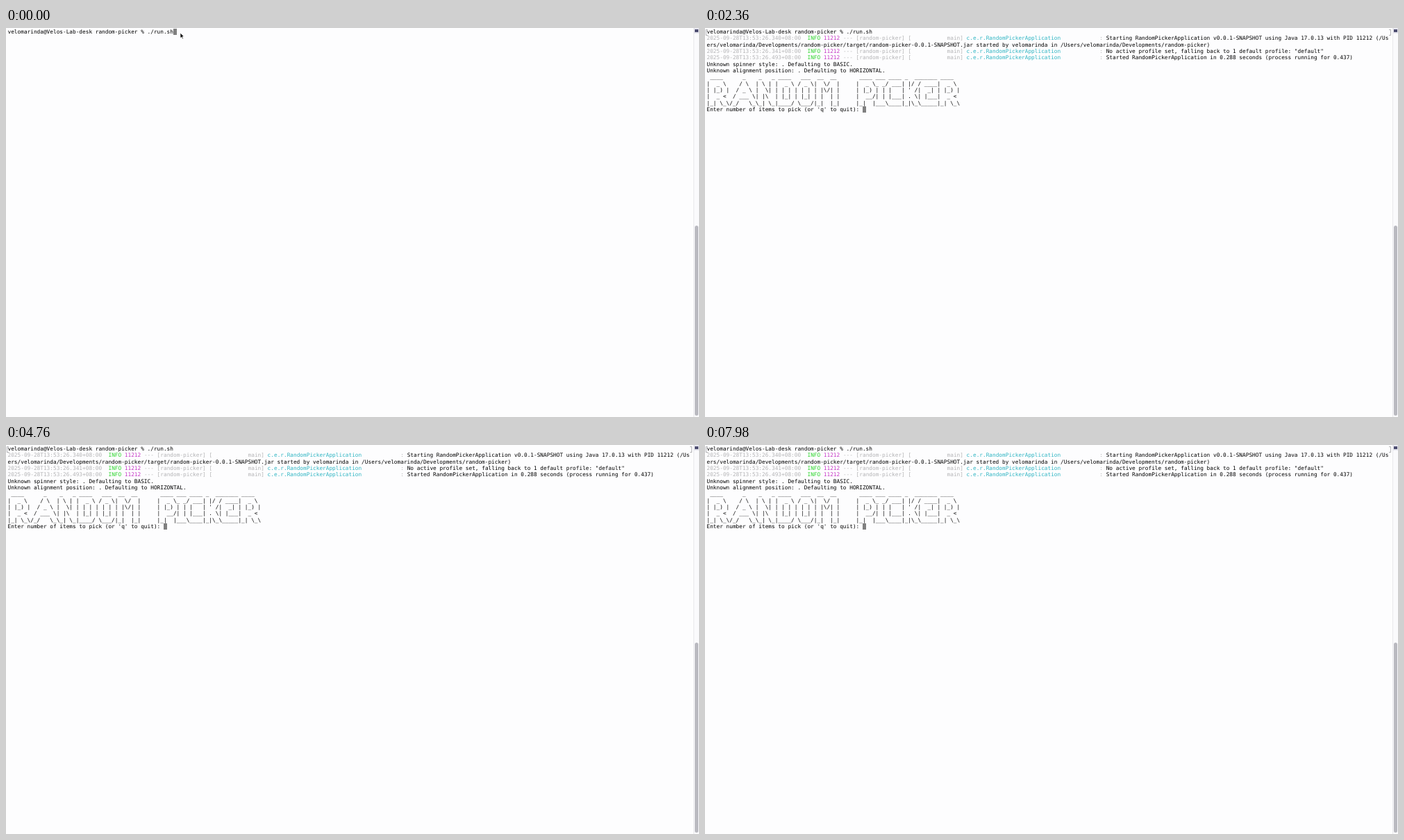
Write an HTML page that moves like this. It is 998 px wide and 561 px high and loops after 8000 ms.

```html
<!DOCTYPE html>
<html lang="en">
<head>
<meta charset="utf-8">
<title>Random picker in a terminal</title>
<style>
  html, body { margin: 0; width: 100%; height: 100%; overflow: hidden; background: #fdfdfe; }
  #stage { position: relative; width: 998px; height: 561px; overflow: hidden; }
  #stage > * { position: absolute; }
  pre {
    left: 2.5px; top: 1px; margin: 0; color: #000;
    font: 7.773px/9.33px "DejaVu Sans Mono", monospace;
    text-rendering: geometricPrecision; font-variant-ligatures: none;
  }
  .dim { color: #b4b4b6; }
  .level { color: #2bd52b; }
  .pid { color: #c536c5; }
  .logger { color: #2fb5c3; }
  #cursor { width: 4.7px; height: 9.2px; background: #808080; }
  .mark { top: 2px; width: 1.5px; height: 7px; border: .7px solid #b5b5b8; }
  #open { left: 1px; border-right: 0; }
  #close { left: 985px; border-left: 0; }
  #track { left: 990px; top: 0; width: 7px; height: 561px; background: #fafafc; border-left: 1px solid #e8e8ec; }
  #thumb { left: 992px; top: 285px; width: 4.5px; height: 274px; border-radius: 2.5px; background: #b9b9c0; }
  #split { left: 991px; top: 0; width: 7px; height: 8px; background: #e6e6ee; }
  #split::after { content: ""; position: absolute; left: 1px; top: 1.5px; width: 4.5px; height: 4.5px; background: #4c4c70; }
  #pointer { left: 249px; top: 5px; }
</style>
</head>
<body>
<div id="stage">
  <div id="cursor"></div>
<pre>velomarinda@Velos-Lab-desk random-picker % ./run.sh
<span data-from="logs"><span class="dim">2025-09-28T13:53:26.340+08:00</span>  <span class="level">INFO</span> <span class="pid">11212</span> <span class="dim">--- [random-picker] [           main]</span> <span class="logger">c.e.r.RandomPickerApplication</span>            <span class="dim">:</span> Starting RandomPickerApplication v0.0.1-SNAPSHOT using Java 17.0.13 with PID 11212 (/Us
ers/velomarinda/Developments/random-picker/target/random-picker-0.0.1-SNAPSHOT.jar started by velomarinda in /Users/velomarinda/Developments/random-picker)
<span class="dim">2025-09-28T13:53:26.341+08:00</span>  <span class="level">INFO</span> <span class="pid">11212</span> <span class="dim">--- [random-picker] [           main]</span> <span class="logger">c.e.r.RandomPickerApplication</span>            <span class="dim">:</span> No active profile set, falling back to 1 default profile: "default"</span>
<span data-from="started"><span class="dim">2025-09-28T13:53:26.493+08:00</span>  <span class="level">INFO</span> <span class="pid">11212</span> <span class="dim">--- [random-picker] [           main]</span> <span class="logger">c.e.r.RandomPickerApplication</span>            <span class="dim">:</span> Started RandomPickerApplication in 0.288 seconds (process running for 0.437)
Unknown spinner style: . Defaulting to BASIC.
Unknown alignment position: . Defaulting to HORIZONTAL.
 ____      _    _   _ ____   ___  __  __       ____ ___ ____ _  _______ ____
|  _ \    / \  | \ | |  _ \ / _ \|  \/  |     |  _ \_ _/ ___| |/ / ____|  _ \
| |_) |  / _ \ |  \| | | | | | | | |\/| |     | |_) | | |   | ' /|  _| | |_) |
|  _ &lt;  / ___ \| |\  | |_| | |_| | |  | |     |  __/| | |___| . \| |___|  _ &lt;
|_| \_\/_/   \_\_| \_|____/ \___/|_|  |_|     |_|  |___\____|_|\_\_____|_| \_\
Enter number of items to pick (or 'q' to quit): </span></pre>
  <div id="open" class="mark" data-from="enter"></div>
  <div id="close" class="mark" data-from="enter"></div>
  <div id="track"></div>
  <div id="thumb"></div>
  <div id="split"></div>
  <svg id="pointer" data-until="enter" width="9" height="13">
    <path d="M2 2v7.6l1.8-1.6 1.3 2.8 1.2-.6-1.3-2.7h2.3z" fill="#000" stroke="#fff" stroke-width=".7"/>
  </svg>
</div>
<script>
const LOOP = 8000;
const CELL = { width: 4.68, height: 9.33 };
const EVENTS = { enter: 400, logs: 2000, started: 2160 };
const CURSOR_STOPS = [
  { at: 0, col: 51, row: 0 },
  { at: EVENTS.enter, col: 0, row: 1 },
  { at: EVENTS.logs, col: 0, row: 4 },
  { at: EVENTS.started, col: 48, row: 12 },
];
const cursor = document.getElementById("cursor");
const timed = document.querySelectorAll("[data-from], [data-until]");

function render(now) {
  const t = now % LOOP;
  for (const el of timed) {
    const from = EVENTS[el.dataset.from] ?? 0;
    const until = EVENTS[el.dataset.until] ?? LOOP;
    el.style.visibility = t >= from && t < until ? "visible" : "hidden";
  }
  const { col, row } = CURSOR_STOPS.findLast(stop => t >= stop.at);
  cursor.style.left = 2.5 + col * CELL.width + "px";
  cursor.style.top = 1 + row * CELL.height + "px";
}

const start = performance.now();
function tick() {
  render(performance.now() - start);
  requestAnimationFrame(tick);
}
tick();
</script>
</body>
</html>
```
